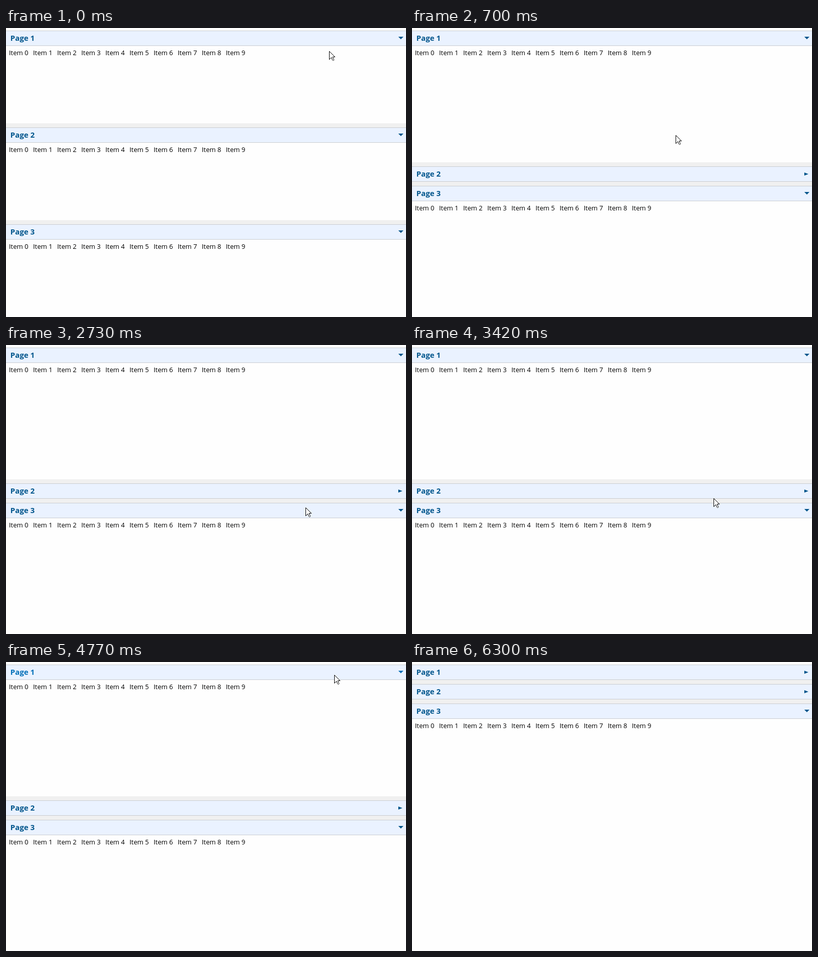
These frames come from a looping animation (780 by 564 pixels, 6.86 s). An HTML page:

```html
<!DOCTYPE html>
<html lang="en">
<head>
<meta charset="utf-8">
<title>Collapsible pages</title>
<style>
  html, body { margin: 0; width: 100%; height: 100%; overflow: hidden; background: #fff; }
  svg { display: block; }
  text { font: 12.8px "Open Sans", sans-serif; fill: #000; white-space: pre; }
  .title { font: bold 14.7px "Open Sans", sans-serif; }
  .title, .twistie { fill: #00558c; }
  .hover .title, .hover .twistie { fill: #006fb8; }
  rect { shape-rendering: crispEdges; }
</style>
</head>
<body>
<svg width="780" height="564" viewBox="0 0 780 564">
  <g id="pages"></g>
  <path id="cursor" d="M.5.5V16.5L4.5 12.5 6.5 17.5 7.5 18.5H8.5L9.5 17.5 7 11.5H11.5Z"
    fill="#fff" stroke="#000" stroke-linejoin="round"/>
</svg>
<script>
const LOOP = 6860, TICK = 135.5; // the screen refreshes once per tick
const TOP = 5, BAR = 30, GAP = 8, BOTTOM = 564;
const DOWN = "765,12 775,12 770,17", RIGHT = "765,12 773,15 765,18";

// Straight pointer moves in ticks; the pointer rests between them.
const START = { x: 630, y: 45 };
const MOVES = [
  { from: 0, to: 2, x: 518, y: 200 },
  { from: 2, to: 3, x: 514, y: 209 },
  { from: 6, to: 7, x: 513, y: 213 },
  { from: 7, to: 9, x: 549, y: 312 },
  { from: 9, to: 11, x: 587, y: 295 },
  { from: 15, to: 16, x: 588, y: 302 },
  { from: 16, to: 18, x: 584, y: 317 },
  { from: 22, to: 25, x: 588, y: 299 },
  { from: 25, to: 27, x: 594, y: 253 },
  { from: 27, to: 29, x: 593, y: 260 },
  { from: 29, to: 31, x: 595, y: 166 },
  { from: 31, to: 34, x: 640, y: 25 },
  { from: 38, to: 41, x: 616, y: 97 },
  { from: 41, to: 43, x: 616, y: 153 },
  { from: 43, to: 45, x: 745, y: 482 }
];
const POINTER_GONE = 46;

// The tick at which each page collapses; it is highlighted one tick earlier.
const COLLAPSE = [36, 5, Infinity];

function add(parent, tag, attributes, text = "") {
  const node = document.createElementNS(parent.namespaceURI, tag);
  for (const name in attributes) node.setAttribute(name, attributes[name]);
  node.textContent = text;
  return parent.appendChild(node);
}

function makePage(collapse, index) {
  const group = add(document.getElementById("pages"), "g", {});
  const rect = (y, height, fill) => add(group, "rect", { y, width: 780, height, fill });

  const gap = rect(0, GAP, "#f0f0f0");
  const body = rect(BAR, 0, "#fefefe");
  rect(0, BAR, "#cacdd1");
  rect(1, BAR - 2, "#eaf2ff");
  add(group, "text", { class: "title", x: 8.6, y: 20 }, "Page " + (index + 1));
  const twistie = add(group, "polygon", { class: "twistie" });
  const items = add(group, "g", {});
  for (let i = 0; i < 10; i++)
    add(items, "text", { x: 5.8 + 47 * i, y: 48 }, "Item " + i);
  return { collapse, group, gap, body, twistie, items };
}

const pages = COLLAPSE.map(makePage);
const cursor = document.getElementById("cursor");

// Open pages share the free height; the last one takes what remains.
function layout(tick) {
  const openCount = pages.filter(page => tick < page.collapse).length;
  const free = BOTTOM - TOP - BAR * 3 - GAP * 2;
  const share = Math.ceil(free / openCount);
  let y = TOP;
  for (const page of pages) {
    const open = tick < page.collapse;
    const height = open ? Math.min(share, BOTTOM - y - BAR) : 0;
    page.group.setAttribute("transform", `translate(0 ${y})`);
    page.group.setAttribute("class", tick === page.collapse - 1 ? "hover" : "");
    page.body.setAttribute("height", height);
    page.gap.setAttribute("y", BAR + height);
    page.items.setAttribute("visibility", open ? "visible" : "hidden");
    page.twistie.setAttribute("points", open ? DOWN : RIGHT);
    y += BAR + height + GAP;
  }
}

function pointerAt(tick) {
  let { x, y } = START;
  for (const move of MOVES) {
    const part = Math.max(0, Math.min(1, (tick - move.from) / (move.to - move.from)));
    x += (move.x - x) * part;
    y += (move.y - y) * part;
  }
  return [Math.round(x), Math.round(y)];
}

function draw(time) {
  const tick = Math.floor(time % LOOP / TICK);
  layout(tick);
  cursor.setAttribute("transform", `translate(${pointerAt(tick)})`);
  cursor.setAttribute("visibility", tick < POINTER_GONE ? "visible" : "hidden");
}

const began = performance.now();
function animate() {
  draw(performance.now() - began);
  requestAnimationFrame(animate);
}
animate();
</script>
</body>
</html>
```
